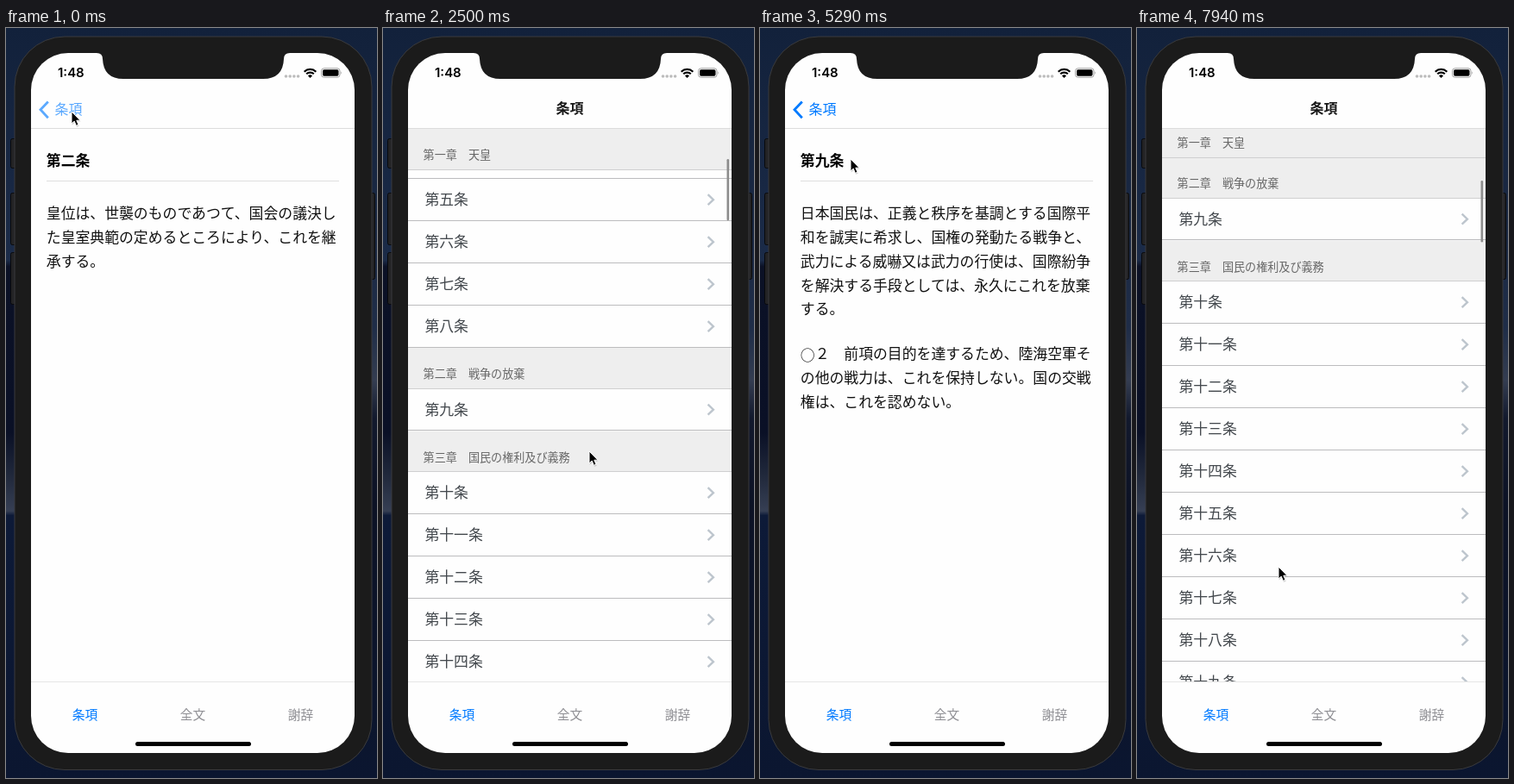
An HTML page for the animation above (8 s loop, 430 by 870 pixels).

```html
<!DOCTYPE html>
<html lang="ja">
<head>
<meta charset="utf-8">
<title>条項</title>
<style>
  html, body { margin: 0; width: 100%; height: 100%; overflow: hidden; background: #0c1833; }
  svg { display: block; }
  text { font-family: "Noto Sans CJK JP", "Noto Sans CJK", sans-serif; white-space: pre; }
  .time { font-family: Inter, "Open Sans", sans-serif; font-weight: 600; }
</style>
</head>
<body>
<svg id="stage" width="430" height="870" viewBox="0 0 430 870">
  <defs>
    <linearGradient id="skyL" x2="0" y2="1">
      <stop offset="0" stop-color="#12213b"/><stop offset=".31" stop-color="#1b2b48"/>
      <stop offset=".318" stop-color="#0b1126"/><stop offset=".54" stop-color="#0a1026"/>
      <stop offset=".6" stop-color="#222a3d"/><stop offset=".644" stop-color="#363f54"/>
      <stop offset=".65" stop-color="#0d1a38"/><stop offset="1" stop-color="#0b1630"/>
    </linearGradient>
    <linearGradient id="skyR" x2="0" y2="1">
      <stop offset="0" stop-color="#12213b"/><stop offset=".4" stop-color="#1f2d48"/>
      <stop offset=".47" stop-color="#343d51"/><stop offset=".52" stop-color="#12192d"/>
      <stop offset=".64" stop-color="#0c1225"/><stop offset="1" stop-color="#0b1630"/>
    </linearGradient>
    <clipPath id="screen"><rect x="29" y="29" width="375" height="812" rx="43"/></clipPath>
    <clipPath id="pane"><rect x="29" y="117" width="375" height="641"/></clipPath>
  </defs>

  <rect width="215" height="870" fill="url(#skyL)"/>
  <rect x="215" width="215" height="870" fill="url(#skyR)"/>
  <g fill="#232325" stroke="#08090c">
    <rect x="5.5" y="128.500" width="8" height="34" rx="2"/>
    <rect x="5.5" y="191.500" width="8" height="60" rx="2"/>
    <rect x="5.5" y="260.500" width="8" height="60" rx="2"/>
    <rect x="419.500" y="191.500" width="8" height="100" rx="2"/>
  </g>
  <rect x="10" y="10" width="414" height="850.500" rx="58" fill="#1b1b1b" stroke="#3a3b3e"/>

  <g clip-path="url(#screen)">
    <rect x="29" y="29" width="375" height="812" fill="#fefefe"/>
    <g clip-path="url(#pane)">
      <g id="list">
        <g id="rows"></g>
        <g id="sticky"></g>
        <rect id="bar" x="398.500" width="2.600" height="71.500" rx="1.300" fill="#8c8c8c"/>
      </g>
      <g id="detail"><rect x="29" y="117" width="376" height="641" fill="#fefefe"/></g>
    </g>
    <rect x="29" y="116" width="375" height="1" fill="#dcdcdc"/>
    <rect x="29" y="758" width="375" height="1" fill="#e6e6e6"/>
    <g id="nav">
      <g id="back"><path d="M48.800 85.500L40 94.800L48.800 104.200" fill="none" stroke="#007aff" stroke-width="2.800"/></g>
    </g>
    <rect x="150" y="828" width="134" height="5" rx="2.500"/>

    <text class="time" x="60" y="57.300" font-size="15">1:48</text>
    <g fill="#bcbcbc">
      <circle cx="324.500" cy="56" r="1.800"/><circle cx="329.200" cy="56" r="1.800"/>
      <circle cx="333.900" cy="56" r="1.800"/><circle cx="338.600" cy="56" r="1.800"/>
    </g>
    <g fill="none" stroke="#000" stroke-width="2.200">
      <path d="M345.700 50.700A9.800 9.800 0 0 1 359.300 50.700"/>
      <path d="M348.200 53.300A6.200 6.200 0 0 1 356.800 53.300"/>
    </g>
    <path d="M352.500 58L350 55.500A3.500 3.500 0 0 1 355 55.500Z"/>
    <rect x="365.500" y="46.800" width="21.500" height="10.400" rx="3" fill="none" stroke="#a0a0a0"/>
    <rect x="367" y="48.300" width="18.500" height="7.400" rx="1.700"/>
    <path d="M388.300 50.300q1.600 1.700 0 3.400z" fill="#999"/>
    <path d="M105 28V29Q112 29 112 36Q113 59 136 59H298Q321 59 322 36Q322 29 329 29V28Z" fill="#1b1b1b"/>
  </g>

  <g id="cursor">
    <path d="M.7 1.500V15.500L3.800 12.600L6 17.800L8.700 16.700L6.500 11.600H10.600Z" fill="#000" opacity=".18"/>
    <path d="M0 0V14L3.200 11.100L5.400 16.300L8 15.200L5.800 10.200H10Z" stroke="#fff" stroke-width="1"/>
  </g>
</svg>

<script>
const LOOP = 8000, LEFT = 29, TOP = 117, WIDTH = 375;
const HEAD = 47.5, ROW = 49, BODY = 16.85;
const $ = id => document.getElementById(id);

function add(parent, tag, attrs, content) {
  const node = document.createElementNS('http://www.w3.org/2000/svg', tag);
  for (const key in attrs) node.setAttribute(key, attrs[key]);
  if (content) node.textContent = content;
  parent.appendChild(node);
  return node;
}
// cy is the vertical middle of the characters
const label = (parent, x, cy, size, str, fill, extra) =>
  add(parent, 'text', { x, y: cy + size * 0.38, 'font-size': size, fill, ...extra }, str);
const line = (parent, y, fill) =>
  add(parent, 'rect', { x: LEFT, y: TOP + Math.floor(y), width: WIDTH, height: 1, fill });

// Article list
const digits = '〇一二三四五六七八九';
const kanji = n => (n >= 20 ? digits[Math.floor(n / 10)] : '') + (n >= 10 ? '十' : '') + (n % 10 ? digits[n % 10] : '');
const articles = (from, to) =>
  Array.from({ length: to - from + 1 }, (_, i) => `第${kanji(from + i)}条`);
const sections = [
  { name: '前文', items: ['前文'] },
  { name: '第一章　天皇', items: articles(1, 8) },
  { name: '第二章　戦争の放棄', items: articles(9, 9) },
  { name: '第三章　国民の権利及び義務', items: articles(10, 24) }
];

function header(parent, name, y) {
  add(parent, 'rect', { x: LEFT, y: TOP + y, width: WIDTH, height: HEAD, fill: '#eeeeee' });
  line(parent, y + 47, '#cfcfd0');
  return label(parent, 46.6, TOP + y + 30.5, 13.08, name, '#666');
}

let ninth, y = 0;
sections.forEach((section, s) => {
  section.top = y;
  header($('rows'), section.name, y);
  y += HEAD;
  section.items.forEach(item => {
    const height = s ? ROW : ROW - 1;
    const cy = TOP + y + height / 2 - 0.8;
    const row = add($('rows'), 'g', {});
    label(row, 48.4, cy, BODY, item, '#43484d');
    add(row, 'path', {
      d: `M376.600 ${cy - 5.5}l6.300 6l-6.300 6`, fill: 'none', stroke: '#bdc5cd', 'stroke-width': 2.4
    });
    y += height;
    line($('rows'), y - 1, '#bcbcbe');
    if (item === '第九条') ninth = row;
  });
});
const stickyText = header($('sticky'), '', 0);

// Article pages
function page(title, paragraphs) {
  const g = add($('detail'), 'g', {});
  label(g, 46.8, 154, BODY, title, '#000', { 'font-weight': 700 });
  add(g, 'rect', { x: 47, y: 177, width: 339, height: 1, fill: '#dedede' });
  paragraphs.forEach(([start, lines]) => lines.forEach((str, i) => {
    const cy = start + i * 27.75;
    if (str[0] === '○') {
      label(g, 46.8, cy + 2, BODY, '○', '#111');
      label(g, 46.8 + BODY, cy, BODY, str.slice(1), '#111');
    } else label(g, 46.8, cy, BODY, str, '#111');
  }));
  return g;
}
const second = page('第二条', [[215, [
  '皇位は、世襲のものであつて、国会の議決し',
  'た皇室典範の定めるところにより、これを継',
  '承する。']]]);
const nine = page('第九条', [[215, [
  '日本国民は、正義と秩序を基調とする国際平',
  '和を誠実に希求し、国権の発動たる戦争と、',
  '武力による威嚇又は武力の行使は、国際紛争',
  'を解決する手段としては、永久にこれを放棄',
  'する。']], [378, [
  '○２　前項の目的を達するため、陸海空軍そ',
  'の他の戦力は、これを保持しない。国の交戦',
  '権は、これを認めない。']]]);

// Navigation and tabs
label($('back'), 56.6, 94, 15.94, '条項', '#007aff');
const middle = { 'text-anchor': 'middle' };
const title = label($('nav'), 216.5, 93.3, 15.94, '条項', '#191919', { ...middle, 'font-weight': 700 });
['条項', '全文', '謝辞'].forEach((tab, i) =>
  label($('nav'), 91.5 + 125 * i, 796.3, 14.7, tab, i ? '#8e8e93' : '#007aff', middle));

// Motion
const bursts = [[150, 890, 6], [1190, 2210, 8], [2350, 3380, 8], [3670, 4260, 5],
                [4850, 5730, 7], [6030, 7060, 8], [7210, 7940, 6]];
const ticks = [0];
for (const [from, to, n] of bursts)
  for (let i = 0; i < n; i++) ticks.push(Math.floor((from + (to - from) * i / (n - 1)) / 10) * 10);

const pointer = [
  [0, 76, 97], [300, 77, 98], [440, 100, 145], [590, 150, 265], [740, 195, 365], [890, 210, 393],
  [1190, 210, 393], [1480, 216, 315], [1630, 220, 260], [1770, 224, 300], [2070, 236, 480],
  [2210, 238, 525], [2490, 239, 491], [2790, 242, 450], [3380, 245, 394], [4700, 245, 394],
  [5000, 190, 300], [5290, 105, 152], [5440, 88, 118], [5730, 77, 97], [6470, 77, 98],
  [6770, 120, 400], [7060, 160, 700], [7210, 161, 692], [7500, 164, 625], [8000, 164, 625]
];
const scrolling = [
  [0, 0], [1190, 0], [1340, 22], [1630, 150], [1770, 195], [1920, 222], [2210, 247],
  [2490, 281], [2640, 305], [2930, 327], [3080, 328], [7060, 328], [7210, 336],
  [7360, 375], [7500, 425], [7650, 463], [7790, 487], [7940, 502], [8000, 502]
];

function at(table, t, col) {
  const i = Math.max(1, table.findIndex(row => row[0] >= t));
  const a = table[i - 1], b = table[i];
  return a[col] + (b[col] - a[col]) * (t - a[0]) / (b[0] - a[0]);
}
// Critically damped spring, 0 to 1
function spring(ms) {
  const u = Math.max(0, ms) * 0.01826;
  return 1 - (1 + u) * Math.exp(-u);
}
function pushed(t) {
  if (t < 2000) return 1 - spring(t - 130);
  return t < 5000 ? spring(t - 3637) : 1 - spring(t - 6157);
}
const move = (node, x, y) => node.setAttribute('transform', `translate(${x} ${y})`);
const fade = (node, value) => node.setAttribute('opacity', value);

function draw(t) {
  const scroll = Math.round(at(scrolling, t, 1));
  const p = pushed(t);

  move($('rows'), 0, -scroll);
  const current = sections.filter(s => s.top <= scroll).length - 1;
  stickyText.textContent = sections[current].name;
  move($('sticky'), 0, Math.min(0, Math.ceil(sections[current + 1].top - scroll - HEAD)));
  $('bar').setAttribute('y', 120 + scroll * 0.1135);
  fade($('bar'), t >= 7200 || (t >= 1190 && t < 3200) ? 1 : t > 3200 && t < 3350 ? 0.5 : 0);

  move($('list'), -0.3 * WIDTH * p, 0);
  move($('detail'), Math.round(WIDTH * (1 - p)), 0);
  second.style.display = t < 2000 ? '' : 'none';
  nine.style.display = t < 2000 ? 'none' : '';
  fade(ninth, t >= 3600 && t < 4200 ? 0.75 : 1);

  fade(title, 1 - p);
  fade($('back'), Math.max(0, 2 * p - 1) * (t < 1000 || t >= 6000 ? 0.64 : 1));
  move($('cursor'), Math.round(at(pointer, t, 1)), Math.round(at(pointer, t, 2)));
}

const start = performance.now();
function loop() {
  const t = (performance.now() - start) % LOOP;
  draw(ticks.filter(tick => tick <= t).pop());
  requestAnimationFrame(loop);
}
loop();
</script>
</body>
</html>
```
